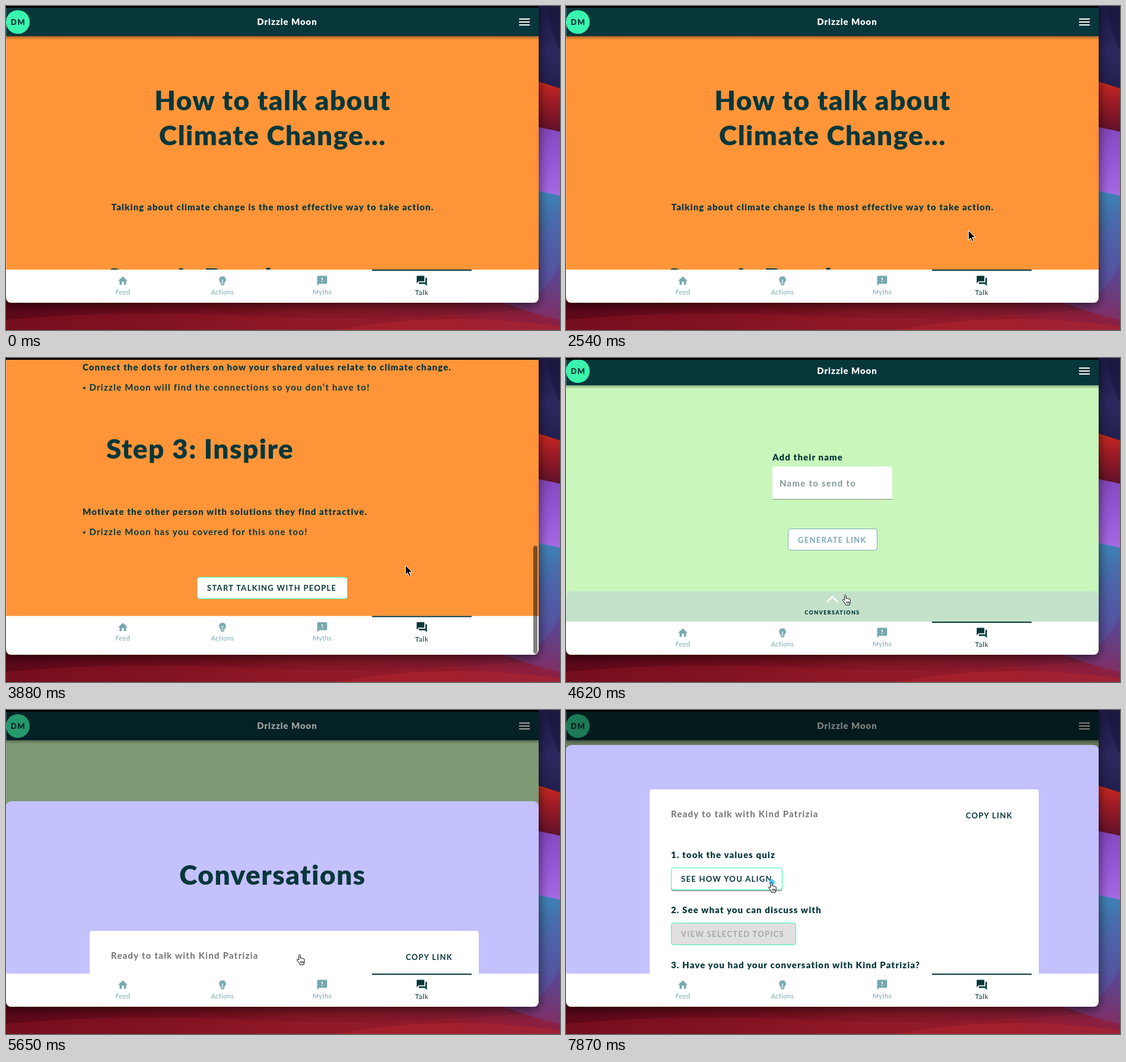
These frames come from a looping animation (934x547 px, 8000 ms). An HTML page:

```html
<!DOCTYPE html>
<html lang="en">
<head>
<meta charset="utf-8">
<title>Talk screen walkthrough</title>
<style>
html, body { margin: 0; width: 100%; height: 100%; overflow: hidden; background: #000; }
svg { display: block; width: 934px; height: 547px; }
text { font-family: Lato, "Open Sans", sans-serif; fill: #07373b; white-space: pre; }
.h { font-size: 46px; font-weight: 900; letter-spacing: 1.45px; }
.b { font-size: 15px; font-weight: 900; letter-spacing: 1.1px; }
.m { font-size: 15px; font-weight: 700; letter-spacing: 1.25px; }
.u { font-size: 13px; font-weight: 700; letter-spacing: 1.3px; }
.s { font-size: 9px; font-weight: 900; letter-spacing: 1.35px; }
.n { font-size: 11px; letter-spacing: .35px; }
.t { font-size: 15px; font-weight: 900; letter-spacing: .9px; }
.d { font-size: 13px; font-weight: 900; letter-spacing: 1.5px; }
.c { text-anchor: middle; }
</style>
</head>
<body>
<svg id="stage" viewBox="0 0 934 547"></svg>
<script>
const LOOP = 8000, STEP = 148.45;
const DARK = '#07373b', MINT = '#39f5ad', TEAL = '#77a9af';
const MAX_SCROLL = 853.5;

const text = (x, y, cls, str, fill) =>
  `<text x="${x}" y="${y}" class="${cls}"${fill ? ` style="fill:${fill}"` : ''}>${str}</text>`;
const rect = (x, y, w, h, fill, extra = '') =>
  `<rect x="${x}" y="${y}" width="${w}" height="${h}" fill="${fill}" ${extra}/>`;
const button = (x, y, w, h, label, fill = '#fff', line = MINT, ink = DARK) =>
  rect(x + .5, y + .5, w - 1, h - 1, fill, `rx="4" stroke="${line}"`) +
  text(x + 17, y + h / 2 + 5, 'u', label, ink);
const gradient = (id, coords, stops) =>
  `<linearGradient id="${id}" gradientUnits="userSpaceOnUse" ${coords}>` +
  stops.map(([o, c]) => `<stop offset="${o}" stop-color="${c}"/>`).join('') + '</linearGradient>';
const down = (a, b) => `x1="0" y1="${a}" x2="0" y2="${b}"`;

const defs = `<defs>
  ${gradient('navy', down(0, 135), [[0, '#1c1a45'], [.6, '#2b2960'], [1, '#24204f']])}
  ${gradient('red', down(128, 212), [[0, '#c9281f'], [.35, '#a51d26'], [1, '#5e1027']])}
  ${gradient('violet', down(205, 320), [[0, '#8448bd'], [.5, '#9557d6'], [1, '#a868e4']])}
  ${gradient('blue', down(313, 547), [[0, '#3f83b8'], [.25, '#4668a8'], [.6, '#5b4694'], [1, '#8a2a5c']])}
  ${gradient('floor', 'x1="0" y1="0" x2="934" y2="0"',
    [[0, '#5e0819'], [.3, '#740e1d'], [.55, '#861826'], [.8, '#86192d'], [1, '#7d2350']])}
  ${gradient('drop', down(51, 57), [[0, 'rgba(0,0,0,.32)'], [1, 'rgba(0,0,0,0)']])}
  <filter id="blur" x="-10%" y="-10%" width="120%" height="125%"><feGaussianBlur stdDeviation="10"/></filter>
  <clipPath id="window"><path d="M0 3H898V491Q898 501 888 501H10Q0 501 0 491Z"/></clipPath>
  <clipPath id="sheetBox"><path d="M0 445V69Q0 59 10 59H888Q898 59 898 69V445Z"/></clipPath>
</defs>`;

const wallpaper = `
  ${rect(0, 495, 934, 52, 'url(#floor)')}
  <path d="M0 547V530Q180 512 420 524T934 506V547Z" fill="#a8202d" opacity=".3"/>
  <path d="M560 547Q720 514 934 540V547Z" fill="#b3242d" opacity=".5"/>
  ${rect(890, 0, 44, 215, 'url(#navy)')}
  <path d="M890 0H912Q922 60 934 72V0Z" fill="#1a183e" opacity=".6"/>
  <path d="M890 125L934 139V215H890Z" fill="url(#red)"/>
  <path d="M890 203L934 212V325H890Z" fill="url(#violet)"/>
  <path d="M890 311L934 320V530Q905 525 840 501H890Z" fill="url(#blue)"/>
  <path d="M890 400Q915 380 934 340V430Q920 470 890 490Z" fill="#5068b4" opacity=".35"/>
  ${rect(-10, 0, 908, 506, '#000', 'rx="10" opacity=".62" filter="url(#blur)"')}`;

const bullet = (y, str) =>
  `<circle cx="132" cy="${y - 4.5}" r="2" fill="${DARK}"/>` + text(140.5, y, 'm', str);
const step = (y, title, lead, points) =>
  text(169, y, 'h', title) + text(129, y + 95, 'b', lead) +
  points.map((p, i) => bullet(y + 129 + 34 * i, p)).join('');

const intro = `<g id="intro">${rect(0, 0, 898, 501, '#ff9538')}<g id="article">
  ${text(449.5, 175.5, 'h c', 'How to talk about')}
  ${text(449.5, 234.5, 'h c', 'Climate Change...')}
  ${text(449.5, 345, 'b c', 'Talking about climate change is the most effective way to take action.')}
  ${step(475.5, 'Step 1: Bond', 'Find out what matters most to the other person.',
    ['Listen to what they have to say.', 'Ask open questions about their life.', 'Share what you care about too.'])}
  ${step(789, 'Step 2: Connect', 'Connect the dots for others on how your shared values relate to climate change.',
    ['Drizzle Moon will find the connections so you don’t have to!'])}
  ${step(1033, 'Step 3: Inspire', 'Motivate the other person with solutions they find attractive.',
    ['Drizzle Moon has you covered for this one too!'])}
  ${button(322, 1232.5, 254, 37.5, 'START TALKING WITH PEOPLE')}
</g></g>`;

const form = `<g id="form">${rect(0, 0, 898, 501, '#c9f6bb')}
  ${text(348, 173, 'b', 'Add their name')}
  <path d="M348 239V187Q348 183 352 183H546Q550 183 550 187V239Z" fill="#fff"/>
  ${rect(348, 238, 202, 1, '#858585')}
  ${text(360, 217, 'm', 'Name to send to', '#829697')}
  ${button(374, 288, 151, 37, 'GENERATE LINK', '#fff', TEAL, TEAL)}
  <path id="bar" d="M0 445V404Q0 394 10 394H888Q898 394 898 404V445Z"/>
  <path d="M440 412L449 403L458 412" fill="none" stroke="#fff" stroke-width="3"/>
  ${text(449, 433, 's c', 'CONVERSATIONS')}
  <circle id="press" cx="495" cy="411" fill="${DARK}" opacity=".13"/>
</g>`;

const header = `<g id="header">
  ${rect(0, 51, 898, 6, 'url(#drop)')}
  ${rect(0, -10, 898, 61, DARK)}
  <circle cx="20" cy="27" r="20" fill="${MINT}"/>
  ${text(20.6, 31.5, 'd c', 'DM')}
  ${text(474, 31.5, 't c', 'Drizzle Moon', '#fff')}
  <path d="M865 22H883M865 27H883M865 32H883" stroke="#fff" stroke-width="2"/>
</g>`;

const sheet = `${rect(0, 3, 898, 442, '#000', 'id="shade"')}
<g id="sheet"><g clip-path="url(#sheetBox)">
  ${rect(0, 59, 898, 390, '#c4c1ff')}
  <g id="talks">
    ${text(449.5, 100, 'h c', 'Conversations')}
    ${rect(141, 179, 656, 700, '#6a68a0', 'rx="4" opacity=".35"')}
    ${rect(141, 178, 656, 700, '#fff', 'rx="4"')}
    ${text(177, 225, 'm', 'Ready to talk with Kind Patrizia', '#707070')}
    ${text(674, 227, 'u', 'COPY LINK')}
    ${text(177, 294, 'b', '1. took the values quiz')}
    ${rect(177, 312, 188, 38, '#000', 'rx="4" opacity=".32"')}
    ${button(177, 310, 188, 38, 'SEE HOW YOU ALIGN')}
    <circle id="tap" cx="347" cy="335" r="5" fill="#4fd0ee"/>
    ${text(177, 387, 'b', '2. See what you can discuss with')}
    ${button(177, 403, 211, 38, 'VIEW SELECTED TOPICS', '#e0e0e0', MINT, '#a6a6a6')}
    ${text(177, 480, 'b', '3. Have you had your conversation with Kind Patrizia?')}
  </g>
</g></g>`;

const icon = (x, d, fill, size = .8) =>
  `<path transform="translate(${x - 12 * size} ${464 - 12 * size}) scale(${size})" d="${d}" fill="${fill}"/>`;
const nav = `<g id="nav">
  ${rect(0, 445, 898, 80, '#fff')}
  ${rect(617, 445, 168, 2, DARK)}
  ${icon(197, 'M10 20v-6h4v6h5v-8h3L12 3 2 12h3v8z', TEAL)}
  ${icon(365, 'M12 2.5a7 7 0 0 0-5 12c.7.7 1 1.3 1 2V19q0 2 2 2h.3q1.7 2 3.4 0H14q2 0 2-2v-2.5c0-.7.3-1.3 1-2a7 7 0 0 0-5-12zM10 16h4v1h-4zm0 2h4v1h-4z', TEAL)}
  <path d="M362.5 461.5L365 464.5L367.5 461.5M365 464.5V467" fill="none" stroke="#fff"/>
  ${icon(533, 'M20 2H4Q2 2 2 4V22l4-4h14q2 0 2-2V4q0-2-2-2zm-7 12h-2v-2h2zm0-4h-2V6h2z', TEAL, .84)}
  ${icon(701, 'M21 6h-2v9H6v2q0 1 1 1h11l4 4V7q0-1-1-1zm-4 6V3q0-1-1-1H3Q2 2 2 3v14l4-4h10q1 0 1-1z', DARK, .86)}
  ${text(197, 486.5, 'n c', 'Feed', TEAL)}
  ${text(365, 486.5, 'n c', 'Actions', TEAL)}
  ${text(533, 486.5, 'n c', 'Myths', TEAL)}
  <text x="701" y="488" class="n c" style="font-size:12px;letter-spacing:.6px">Talk</text>
</g>`;

const cursors = `
  <path id="arrow" d="M0 0V16L3.7 12.6L6.3 18.6L8.9 17.5L6.3 11.6H11.3Z" fill="#000" stroke="#fff"/>
  <path id="hand" d="M-1.3 1.5C-1.3-.6 1.3-.6 1.3 1.5V6.3C1.8 5.2 3.7 5.4 3.8 6.7C4.4 5.8 6.1 6.1 6.2 7.4C6.9 6.7 8.3 7.1 8.3 8.4V11.5C8.3 13.5 7.3 14.4 6.9 17H.4C-.3 14-2.7 11.4-4.5 9.6C-5.4 8.2-3.8 7-2.5 8.1L-1.3 9.3Z M1.8 11V14.5M4 11V14.5M6 11V14.5" fill="#fff" stroke="#000"/>`;

const stage = document.getElementById('stage');
stage.innerHTML = defs + wallpaper + rect(0, 0, 898, 4, '#000') +
  `<g clip-path="url(#window)">${intro}${form}${header}${sheet}${nav}
    ${rect(889, 0, 7, 182, '#000', 'id="thumb" rx="3.5"')}
    ${rect(0, 3, 1, 498, '#fff', 'opacity=".25"')}</g>` + cursors;

const el = {};
stage.querySelectorAll('[id]').forEach(node => { el[node.id] = node; });
const set = (id, name, value) => el[id].setAttribute(name, value);
const show = (id, on) => set(id, 'display', on ? 'inline' : 'none');
const move = (id, x, y) => set(id, 'transform', `translate(${x} ${y})`);

// Linear interpolation through [tick, value] points
function track(points, k) {
  if (k <= points[0][0]) return points[0][1];
  for (let i = 1; i < points.length; i++) {
    const [a, from] = points[i - 1], [b, to] = points[i];
    if (k <= b) return from + (to - from) * (k - a) / (b - a);
  }
  return points[points.length - 1][1];
}

const pageScroll = [[19, 0], [20, 18], [21, 100], [22, 270], [23, 490], [24, 700], [25, 830], [26, 863], [27, MAX_SCROLL]];
const headerY = [[20, 0], [22, -62], [29, -62], [30, -28], [31, -5], [32, 0]];
const sheetY = [[37, 386], [38, 95], [39, 12], [40, 0]];
const sheetScroll = [[41, 0], [42, 12], [43, 52], [44, 100], [45, 122], [46, 135], [48, 144]];
const thumbFade = [[50, .5], [52, 0]];
const cursorX = [[2, 655], [8, 695], [10, 700], [16, 700], [17, 678.5], [18, 673.5], [26, 673.5], [27, 640],
  [28, 540], [29, 474], [31, 471], [36, 495], [41, 495], [42, 505], [44, 528], [47, 528], [49, 420], [51, 304], [53, 346]];
const cursorY = [[2, 552], [10, 472], [16, 472], [17, 379], [18, 350], [26, 350], [28, 388],
  [29, 400], [31, 400], [36, 413], [41, 413], [42, 396], [44, 346], [47, 346], [49, 314], [51, 304], [53, 291]];
const handSpans = [[9, 16], [29, 38], [51, 53]];

function draw(time) {
  const k = Math.floor((time % LOOP) / STEP);
  const scroll = track(pageScroll, k), onIntro = k < 30;
  show('intro', onIntro);
  show('form', !onIntro);
  move('article', 0, -scroll);
  move('nav', 0, onIntro ? -Math.max(0, scroll - MAX_SCROLL) : 0);
  move('header', 0, track(headerY, k));

  const tint = track([[32, 0], [34, 1]], k);
  const mix = (a, b) => Math.round(a + (b - a) * tint);
  set('bar', 'fill', `rgb(${mix(195, 192)},${mix(226, 237)},${mix(201, 182)})`);
  show('press', k === 36 || k === 37);
  set('press', 'r', k === 36 ? 10 : 42);

  const y = track(sheetY, k), depth = track(sheetScroll, k);
  show('sheet', k > 37);
  move('sheet', 0, y);
  set('shade', 'opacity', .5 * (1 - y / 386));
  move('talks', 0, 100 - depth);
  show('tap', k === 53);

  const onSheet = k >= 42;
  show('thumb', (k >= 20 && k < 30) || onSheet);
  set('thumb', 'y', onSheet ? 62 + depth / 10 : 5 + Math.min(scroll, MAX_SCROLL) * 312 / MAX_SCROLL);
  set('thumb', 'height', onSheet ? 39 : 182);
  set('thumb', 'opacity', track(thumbFade, k));

  const hand = handSpans.some(([a, b]) => k >= a && k <= b);
  show('hand', hand);
  show('arrow', !hand && k > 2);
  move(hand ? 'hand' : 'arrow', track(cursorX, k), track(cursorY, k));
}

const start = performance.now();
function tick() {
  draw(performance.now() - start);
  requestAnimationFrame(tick);
}
tick();
</script>
</body>
</html>
```
